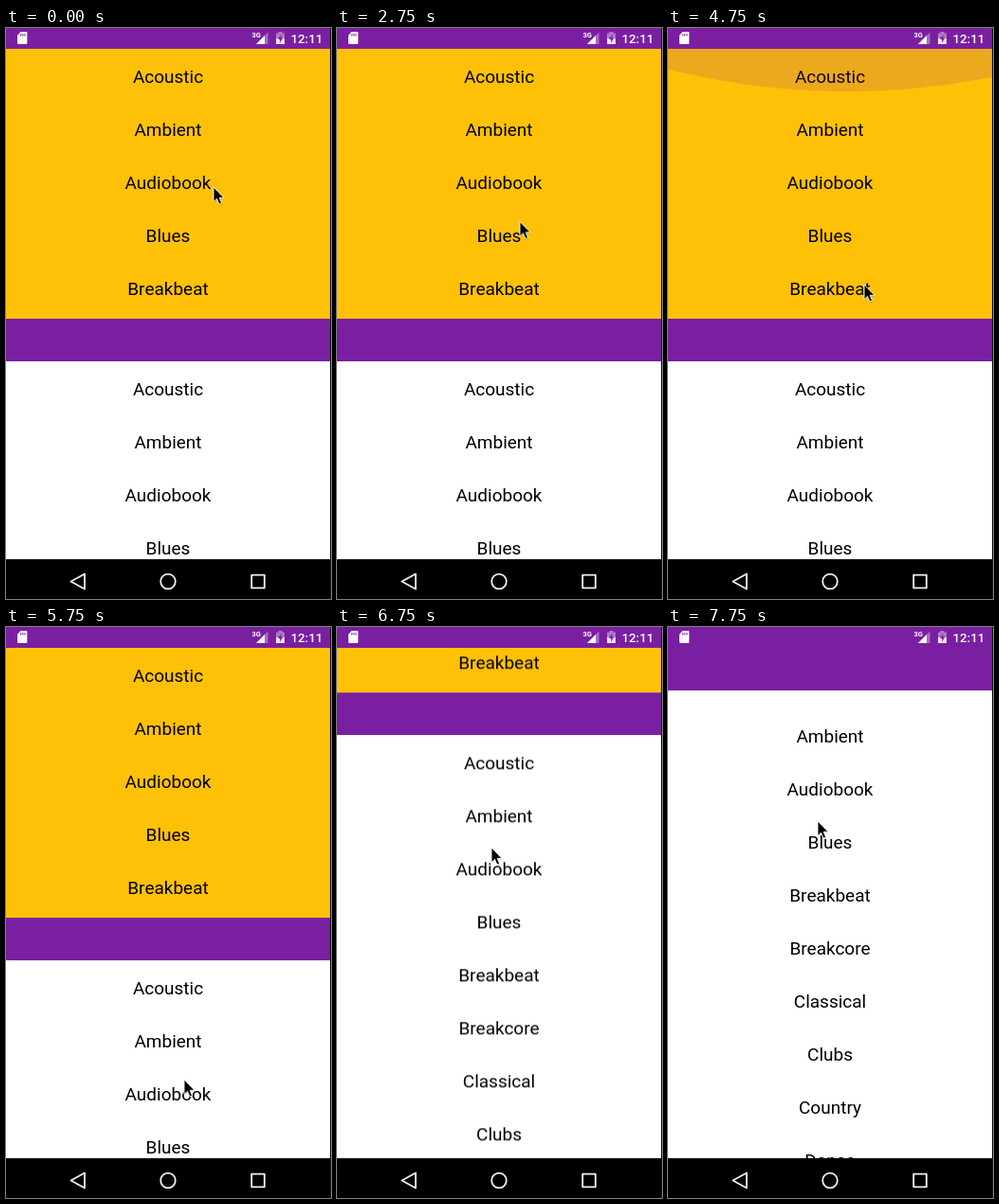
These frames come from a looping animation (343x603 px, 8 s). An HTML page:

```html
<!DOCTYPE html>
<html lang="en">
<head>
<meta charset="utf-8">
<title>Nested scrolling lists</title>
<style>
  html, body { margin: 0; width: 100%; height: 100%; overflow: hidden; background: #000; }
  svg { display: block; }
  svg svg { overflow: hidden; }
  text { font-family: Roboto, sans-serif; }
  .list text { font-size: 19px; text-anchor: middle; fill: #000; }

  /* One step is 250 ms, 3.125% of the loop. */
  #cursor, #page, #top-items, #bottom-items, #glow { animation: 8s step-end infinite; }
  #cursor { animation-name: point; }
  #page { animation-name: collapse; }
  #top-items { animation-name: scroll-top; }
  #bottom-items { animation-name: scroll-bottom; }
  #glow { animation-name: glow; }

  @keyframes point {
    0% { transform: translate(219px, 168px); animation-timing-function: steps(4); }
    12.5% { transform: translate(238px, 255px); }
    18.75% { transform: translate(237px, 256px); animation-timing-function: steps(2); }
    25% { transform: translate(230px, 158px); animation-timing-function: steps(2); }
    31.25% { transform: translate(210px, 179px); animation-timing-function: steps(2); }
    37.5% { transform: translate(176px, 230px); }
    43.75% { transform: translate(178px, 150px); }
    46.875% { transform: translate(182px, 55px); }
    50% { transform: translate(186px, 70px); animation-timing-function: steps(2); }
    56.25% { transform: translate(204px, 236px); }
    59.375% { transform: translate(207px, 271px); animation-timing-function: steps(3); }
    68.75% { transform: translate(196px, 508px); }
    71.875% { transform: translate(188px, 478px); }
    78.125% { transform: translate(183px, 396px); animation-timing-function: steps(2); }
    84.375% { transform: translate(163px, 233px); }
    87.5%, 100% { transform: translate(158px, 205px); }
  }
  @keyframes collapse {
    0% { transform: translateY(0); }
    78.125% { transform: translateY(-65.5px); animation-timing-function: steps(2); }
    84.375% { transform: translateY(-237.7px); }
    87.5%, 100% { transform: translateY(-285px); }
  }
  @keyframes scroll-top {
    0% { transform: translateY(0); }
    43.75% { transform: translateY(-60px); }
    46.875% { transform: translateY(-153px); }
    50% { transform: translateY(-142px); animation-timing-function: steps(2); }
    56.25%, 100% { transform: translateY(0); }
  }
  @keyframes scroll-bottom {
    0% { transform: translateY(0); }
    90.625% { transform: translateY(-22px); }
    93.75% { transform: translateY(-33px); }
    96.875%, 100% { transform: translateY(-37px); }
  }
  @keyframes glow {
    0% { transform: scaleY(0); opacity: 0; }
    56.25% { transform: scaleY(.6); opacity: .8; }
    59.375% { transform: scaleY(1); opacity: 1; }
    62.5% { transform: scaleY(.6); opacity: .55; }
    65.625% { transform: scaleY(.2); opacity: .15; }
    68.75%, 100% { transform: scaleY(0); opacity: 0; }
  }
</style>
</head>
<body>
<svg width="343" height="603" viewBox="0 0 343 603">
  <rect width="343" height="603" fill="#fff"/>

  <g id="page">
    <svg class="list" y="22" width="343" height="285">
      <rect width="343" height="285" fill="#ffc107"/>
      <g id="top-items"></g>
      <g id="glow"><circle cx="189" cy="-731" r="776" fill="#7b1fa2" fill-opacity=".14"/></g>
    </svg>
    <rect y="307" width="343" height="45" fill="#7b1fa2"/>
    <svg class="list" y="352" width="343" height="500">
      <g id="bottom-items"></g>
    </svg>
  </g>

  <g id="status-bar">
    <rect width="343" height="22" fill="#7b1fa2"/>
    <path d="M15.5 4H21.2Q22.3 4 22.3 5V16Q22.3 17 21.2 17H13.2Q12 17 12 16V7.8Z" fill="#fff"/>
    <path d="M15.8 6V8.6M17.9 6V8.6M20 6V8.6" stroke="#7b1fa2" stroke-width="1"/>
    <text x="259.5" y="10" font-size="7.5" font-weight="700" fill="#fff">3G</text>
    <path d="M276.5 4.5V17H264Z" fill="#fff" fill-opacity=".35"/>
    <path d="M273 8V17H264Z" fill="#fff"/>
    <path d="M285 5.5H287.5V4H291.5V5.5H294V17H285Z" fill="#fff" fill-opacity=".4"/>
    <path d="M285 11H294V17H285Z" fill="#fff" fill-opacity=".8"/>
    <path d="M290.3 6.7L287 12H289.2V15.7L292.2 10.4H290.3Z" fill="#7b1fa2"/>
    <text x="300.5" y="15.6" font-size="13.3" font-weight="500" fill="#fff">12:11</text>
  </g>

  <rect y="561" width="343" height="42" fill="#000"/>
  <g fill="none" stroke="#f2f2f2" stroke-width="1.8" stroke-linejoin="round">
    <path d="M83 576.5V592.5L68.5 584.5Z"/>
    <circle cx="171" cy="584.5" r="7.8"/>
    <rect x="259.2" y="577.7" width="13.6" height="13.6"/>
  </g>
  <rect x="342" width="1" height="603" fill="#111"/>

  <g id="cursor">
    <path d="M.5 1V17L4 13.6L6.5 19.4L9.2 18.2L6.8 12.6H11.6Z" fill="#000" fill-opacity=".18"/>
    <path d="M0 0V15.6L3.5 12.3L5.9 18L8.6 16.9L6.2 11.3H11Z" fill="#000" stroke="#fff" stroke-width=".9"/>
  </g>
</svg>
<script>
  const genres = ["Acoustic", "Ambient", "Audiobook", "Blues", "Breakbeat",
    "Breakcore", "Classical", "Clubs", "Country", "Dance"];
  const rowHeight = 56, firstBaseline = 35.6;

  const rows = genres.map((name, i) =>
    `<text x="171" y="${firstBaseline + i * rowHeight}">${name}</text>`).join("");

  for (const id of ["top-items", "bottom-items"])
    document.getElementById(id).innerHTML = rows;
</script>
</body>
</html>
```
